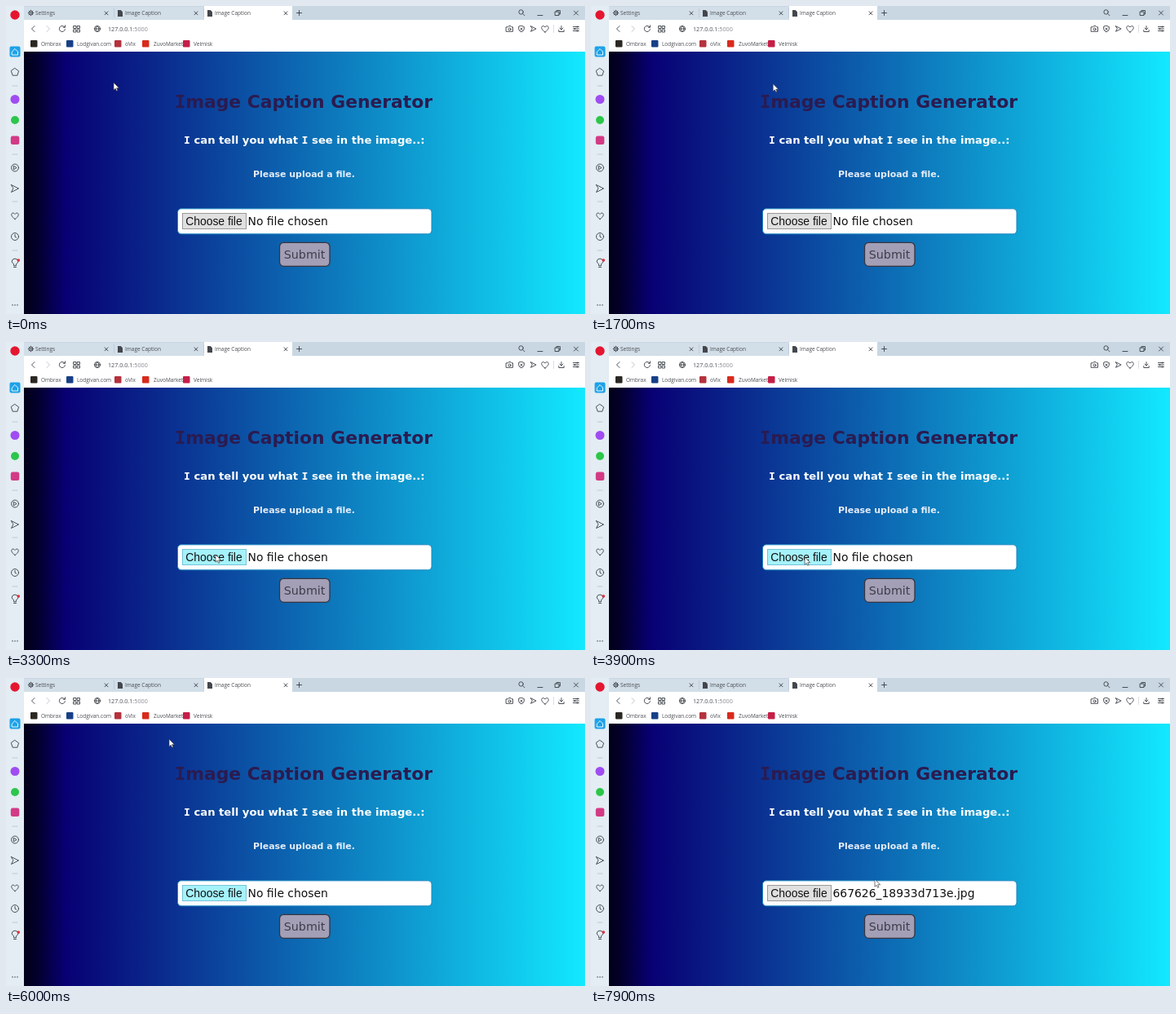
Write an HTML page that moves like this. It is 710 px wide and 378 px high and loops after 8000 ms.

```html
<!DOCTYPE html>
<html lang="en">
<head>
<meta charset="utf-8">
<title>Image Caption</title>
<style>
  html, body { margin: 0; width: 100%; height: 100%; overflow: hidden; background: #fff; }
  svg { display: block; width: 710px; height: 378px; }
  text { white-space: pre; }
  .ui { font-family: "Open Sans", "Noto Sans", sans-serif; font-size: 6.5px; fill: #4a4d52; }
  .page { font-family: "DejaVu Sans", sans-serif; }
  .bold { font-weight: bold; }
  .serif-i { font-family: "DejaVu Sans Mono", monospace; }
  .line { fill: none; stroke: #3a4047; stroke-width: .9; stroke-linecap: round; stroke-linejoin: round; }
</style>
</head>
<body>
<svg viewBox="0 0 710 378" xmlns="http://www.w3.org/2000/svg">
  <defs>
    <linearGradient id="sky">
      <stop offset="0" stop-color="#020018"/>
      <stop offset=".025" stop-color="#03002e"/>
      <stop offset=".075" stop-color="#080074"/>
      <stop offset="1" stop-color="#12e9ff"/>
    </linearGradient>
  </defs>

  <rect width="710" height="378" fill="#e3edf3"/>
  <rect x="22" width="688" height="17" fill="#c9d7e3"/>
  <rect x="22" y="1" width="220" height="16" fill="#d2dee8"/>
  <rect x="243" width="108" height="17" fill="#fff"/>
  <rect x="22" y="17" width="688" height="39" fill="#fff"/>
  <path d="M132.500 3V14M242.500 3V14" stroke="#b7c6d3" stroke-width=".7"/>
  <rect x="22" y="56" width="688" height="322" fill="url(#sky)"/>
  <g id="chrome"></g>

  <g class="page">
    <text class="bold" x="207" y="124.500" font-size="21.850" fill="#2b1b50"><tspan class="serif-i">I</tspan>mage Caption Generator</text>
    <text class="bold" x="218" y="169" font-size="13.150" fill="#fff"><tspan class="serif-i">I</tspan> can tell you what <tspan class="serif-i">I</tspan> see in the image..:</text>
    <text class="bold" x="303" y="210" font-size="10.950" fill="#e6edf8">Please upload a file.</text>
    <rect x="210.500" y="248.800" width="311.500" height="31" rx="4.500" fill="#fff" stroke="#1c86c0"/>
    <rect id="choose" x="216.500" y="254.500" width="78" height="19"/>
    <text x="220.200" y="269.300" font-size="13.900" fill="#111"
      style="font-family:'Liberation Sans',Arial,sans-serif">Choose file</text>
    <text id="file" x="296.500" y="269.200" font-size="13.900" fill="#111"></text>
    <rect x="335.500" y="290.300" width="61.500" height="29" rx="5" fill="#a29fb6" stroke="#38343f" stroke-width="1.300"/>
    <text x="340.700" y="310.200" font-size="14.300" fill="#403c4a">Submit</text>
  </g>

  <path id="cursor" d="M0 0V9.200L2.200 7.300L3.600 10.300L5 9.700L3.700 6.700H6.600Z"
    fill="#fff" stroke="#333" stroke-width=".65" stroke-linejoin="round"/>
</svg>
<script>
const $ = id => document.getElementById(id);
const parts = [];
const line = (d, extra = '') => parts.push(`<path class="line" d="${d}" ${extra}/>`);
const ring = (x, y, r) => parts.push(`<circle class="line" cx="${x}" cy="${y}" r="${r}"/>`);
const dot = (x, y, r, fill) => parts.push(`<circle cx="${x}" cy="${y}" r="${r}" fill="${fill}"/>`);
const box = (x, y, w, h, fill, r = 0) =>
  parts.push(`<rect x="${x}" y="${y}" width="${w}" height="${h}" rx="${r}" fill="${fill}"/>`);
const label = (x, y, s, extra = '') => parts.push(`<text class="ui" x="${x}" y="${y}" ${extra}>${s}</text>`);
const close = (x, y) => line(`M${x - 2} ${y - 2}l4 4m0 -4l-4 4`);
const heart = (x, y) => line(`M${x} ${y + 4}c-8 -5 -3 -10 0 -6c3 -4 8 1 0 6z`);
const plane = (x, y, s) => line(`M${x - s} ${y - s}L${x + s} ${y}L${x - s} ${y + s}L${x - s * .5} ${y}Z`);

// tabs
ring(30.5, 8.5, 2.4);
ring(30.5, 8.5, .8);
for (let a = 0; a < 8; a++) {
  const c = Math.cos(a * Math.PI / 4), s = Math.sin(a * Math.PI / 4);
  line(`M${30.5 + 2.6 * c} ${8.5 + 2.6 * s}l${c * .7} ${s * .7}`);
}
label(36, 11, 'Settings');
for (const x of [137, 247]) {
  parts.push(`<path d="M${x} 5h3.800l2.200 2.200v5.800h-6z" fill="#43474d"/>`);
  label(x + 9, 11, 'Image Caption', x > 200 ? 'fill="#222"' : '');
}
[123, 233, 343].forEach(x => close(x, 8.8));
line('M356.500 8.500h6m-3 -3v6');

// window controls
ring(631.6, 7.4, 2.7);
line('M633.700 9.500l2.200 2.200M652 11.500h6M673.500 7h4.500v4.500h-4.500zM675 7v-1.500h4.500v4.500h-1.500');
line('M696.500 6l5 5m0 -5l-5 5');

// address bar
line('M35 24.500l-3.500 3.500l3.500 3.500');
line('M50 24.500l3.500 3.500l-3.500 3.500', 'style="stroke:#b8bfc6"');
line('M72 26a3.600 3.600 0 1 0 .5 2.500M72.500 23.800v2.400h-2.400');
for (const x of [83, 87.5]) for (const y of [24.5, 29])
  line(`M${x} ${y}h3v3h-3z`);
ring(112, 28, 3.6);
line('M108.400 28h7.200M112 24.400c-2.400 2.400 -2.400 4.800 0 7.200c2.400 -2.400 2.400 -4.800 0 -7.200');
label(125, 30.6, '127.0.0.1<tspan fill="#85898f">:5000</tspan>', 'style="font-size:7.2px" fill="#222"');
line('M613.500 25.800h2l1 -1.300h2.500l1 1.300h1.500v5.500h-8z');
ring(617.6, 28.4, 1.5);
line('M632 24.300l3.300 1.200v2.800q0 2.200 -3.300 3.600q-3.300 -1.400 -3.300 -3.600v-2.800zM630.800 27l2.400 2.400m0 -2.400l-2.400 2.400');
plane(646.8, 28, 3.3);
heart(661, 28);
line('M671.500 23.500v9', 'style="stroke:#d5dae0"');
line('M681 24.500v4.500m-2 -2l2 2l2 -2M677.800 29.500v2h6.400v-2');
line('M695.500 25.500h7M695.500 28h7M695.500 30.500h7');
[[700.5, 25.5], [697.5, 28], [700.5, 30.5]].forEach(([x, y]) => dot(x, y, 1, '#3a4047'));

// bookmarks
[
  [30, '#2b2723', 43, 'Ombrax'],
  [74, '#173f87', 87, 'Lodgivanto.com'.replace('anto', 'an')],
  [133, '#b3323d', 146, 'oVix'],
  [167, '#d92a1c', 181, 'ZuvoMarket'],
  [217, '#c51e48', 230, 'Velmisk']
].forEach(([x, fill, tx, name]) => {
  box(x, 42, 8.5, 8.5, fill, 1);
  label(tx, 48.7, name);
});

// sidebar
dot(11, 11, 5.7, '#e5162f');
box(4.5, 49.5, 13, 13, '#1da2e8', 2);
line('M7.500 56l3.500 -3.500l3.500 3.500v4h-7z', 'style="stroke:#fff"');
line('M11 76.500l4.600 3.300l-1.700 5.400h-5.800l-1.700 -5.400z');
dot(11, 114.5, 5.5, '#a04cf2');
dot(11, 140, 5, '#2cc64b');
box(5.8, 159.5, 10.5, 10.5, '#d33a86', 2.5);
ring(11, 198.5, 4.5);
line('M9.600 196.400l3.500 2.100l-3.500 2.100z');
plane(11, 224, 4.5);
heart(11, 257.5);
ring(11, 283, 4.5);
line('M11 280.300v2.900l1.700 1');
line('M9.500 318.300v-1.700q-2.800 -1.600 -2.300 -3.500a3.900 3.900 0 0 1 7.600 0q.5 1.900 -2.300 3.500v1.700zM9.500 320.500h3');
dot(15.3, 312, 1.8, '#e5283a');
[98, 182, 240, 300].forEach(y => line(`M8 ${y}h6`, 'style="stroke:#b9c5ce"'));
[8, 11, 14].forEach(x => dot(x, 367, .75, '#3a4047'));
$('chrome').innerHTML = parts.join('');

// time, x, y of the pointer tip
const path = [
  [0, 132, 94], [1000, 294, 41], [1800, 220, 98], [2400, 142, 190], [2700, 148, 200],
  [3300, 257, 261], [3700, 262, 264], [5400, 264, 264], [6000, 200, 75],
  [6400, 200, 75], [7400, 345, 250], [7900, 348, 247]
];
const loop = 8000, step = 100;

function pointerAt(t) {
  const i = path.findIndex(p => p[0] > t);
  if (i < 0) return path[path.length - 1].slice(1);
  const a = path[i - 1], b = path[i];
  const u = (t - a[0]) / (b[0] - a[0]), e = u * u * (3 - 2 * u);
  return [a[1] + (b[1] - a[1]) * e, a[2] + (b[2] - a[2]) * e];
}

function draw(now) {
  const t = Math.floor((now % loop) / step) * step;
  const hover = t >= 3200 && t < 7400;
  $('cursor').setAttribute('transform', `translate(${pointerAt(t)})`);
  $('choose').setAttribute('fill', hover ? '#a5f2fb' : '#e0e0e0');
  $('choose').setAttribute('stroke', hover ? '#73c4d6' : '#999');
  $('file').textContent = t < 7400 ? 'No file chosen' : '667626_18933d713e.jpg';
}

const start = performance.now();
function tick() {
  draw(performance.now() - start);
  requestAnimationFrame(tick);
}
tick();
</script>
</body>
</html>
```
